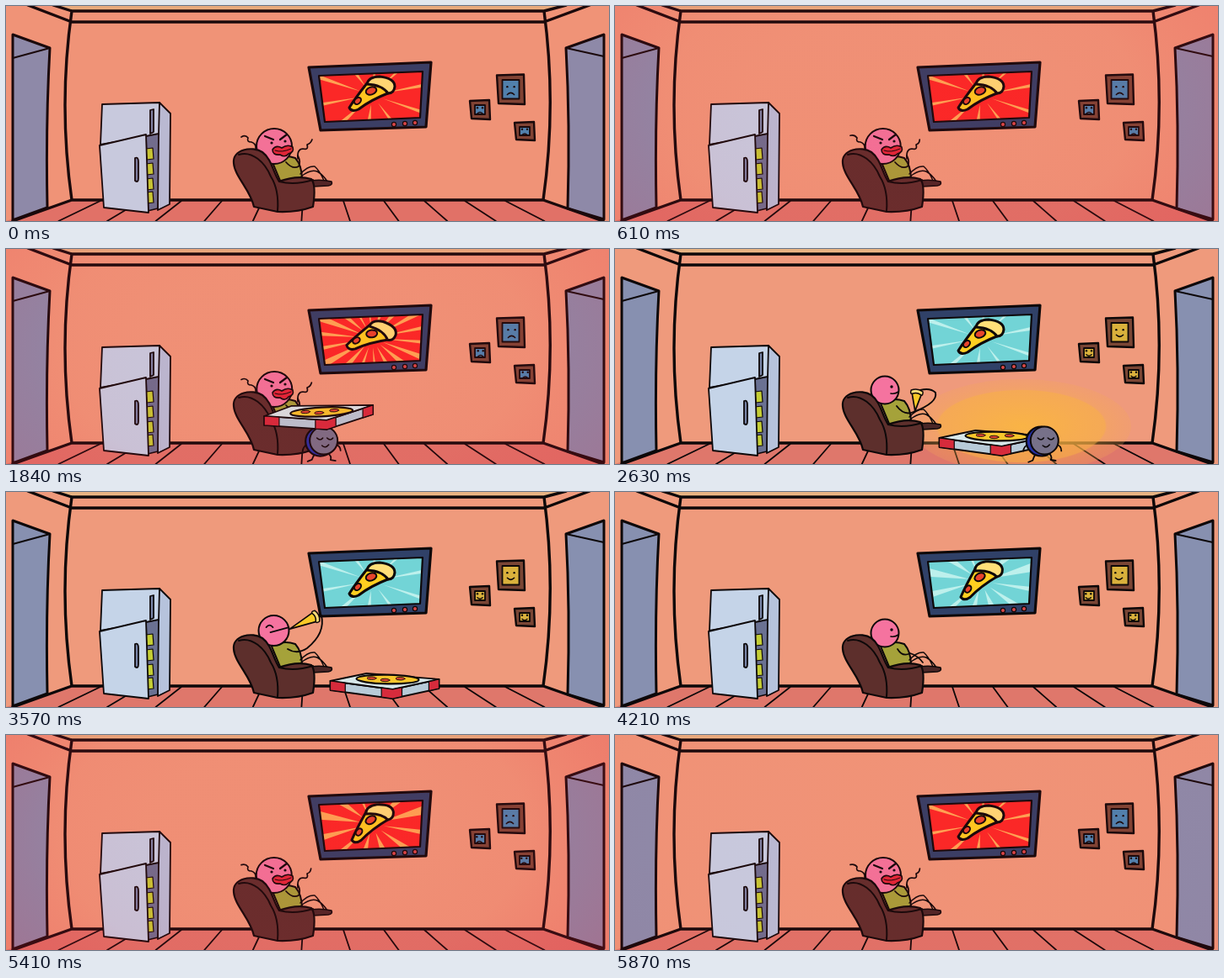
Recreate the animation shown at these times as an HTML page. Size 715 by 256 pixels, loop 5920 ms.

```html
<!DOCTYPE html>
<html lang="en">
<head>
<meta charset="utf-8">
<title>Pizza delivery</title>
<style>
html, body { margin: 0; width: 100%; height: 100%; overflow: hidden; background: #ef9a7c; }
svg { display: block; width: 100%; height: 100%; }
.ink { stroke: #0d0809; stroke-linejoin: round; stroke-linecap: round; }
.line { fill: none; }
</style>
</head>
<body>
<svg viewBox="0 0 715 256" preserveAspectRatio="none">
  <defs>
    <radialGradient id="rage" gradientUnits="userSpaceOnUse" cx="0" cy="0" r="1" gradientTransform="translate(340 115) scale(430 260)">
      <stop offset=".4" stop-color="#e8203c" stop-opacity=".04"/>
      <stop offset=".65" stop-color="#e8203c" stop-opacity=".07"/>
      <stop offset=".75" stop-color="#e8203c" stop-opacity=".12"/>
      <stop offset="1" stop-color="#e8203c" stop-opacity=".22"/>
    </radialGradient>
    <radialGradient id="warm">
      <stop offset="0" stop-color="#fbb83c" stop-opacity=".85"/>
      <stop offset=".76" stop-color="#f8b045" stop-opacity=".7"/>
      <stop offset=".78" stop-color="#f8b045" stop-opacity=".35"/>
      <stop offset="1" stop-color="#f5a755" stop-opacity=".25"/>
    </radialGradient>
    <clipPath id="screenClip"><path d="M371 83L494 78L491 133L378 138Z"/></clipPath>
    <clipPath id="doors"><path d="M8 0H708V256H8Z"/></clipPath>
  </defs>

  <g class="ink" stroke-width="3">
    <path d="M0 0H715V256H0Z" fill="#ef9a7c" stroke="none"/>
    <path d="M58 0L78 6H638L662 0Z" fill="#e8b382" stroke="none"/>
    <path d="M0 256L78 231H637L710 256Z" fill="#df776b" stroke="none"/>
    <path id="planks" class="line" stroke-width="1.8"/>
    <path d="M8 34L52 50Q47 140 49 240L8 255Z" fill="#8790b0"/>
    <path d="M709 34L664 50Q669 140 666 241L709 254Z" fill="#8790b0"/>
    <path class="line" stroke-width="2" d="M52 50L8 62M664 50L709 60"/>
    <path class="line" stroke-width="3.4" d="M56 -1L78 6H638L664 -1M26 -1L78 19H638L692 -1M78 6Q62 118 78 231H637Q653 118 638 6M78 231L8 256M637 231L708 256"/>
  </g>

  <ellipse id="glow" fill="url(#warm)"/>

  <g class="ink" stroke-width="1.8" fill="#c5d4e8">
    <path d="M182 115L195 128L194 236L180 243L176 154Z" fill="#b6c3dc"/>
    <path d="M114 117L182 115L181 153L112 165Z"/>
    <path d="M166 155L181 152L180 241L168 244Z" fill="#6a7192"/>
    <g id="food"></g>
    <path d="M111 166L166 153L169 246L116 240Z"/>
    <path d="M171 124L175 123V150L171 152Z" fill="#7885a8"/>
    <path d="M153 181Q157 179 157 186V205Q157 211 153 208Z" fill="#7885a8"/>
  </g>

  <g class="ink" stroke-width="3.2">
    <path d="M359 73L504 67L498 144L373 148Z" fill="#304168"/>
    <g clip-path="url(#screenClip)" stroke="none">
      <path id="screen" d="M365 73H500V143H365Z"/>
      <path id="rays"/>
    </g>
    <path class="line" stroke-width="2.2" d="M371 83L494 78L491 133L378 138Z"/>
    <g fill="#d84848" stroke-width="1.2">
      <circle cx="460" cy="141" r="2.6"/><circle cx="473" cy="140" r="2.6"/><circle cx="485" cy="139" r="2.6"/>
    </g>
    <g id="tvPizza" stroke-width="3">
      <path d="M428 92Q444 91 455 103Q432 112 418 123Q410 127 407 121Q414 110 428 92Z" fill="#ffcf20"/>
      <path d="M428 93Q430 84 443 84Q461 86 461 96Q460 104 453 104Q446 94 428 93Z" fill="#ffdf78"/>
      <ellipse cx="433" cy="101" rx="6.5" ry="4.4" transform="rotate(-20 433 101)" fill="#e8452c" stroke-width="2"/>
      <ellipse cx="417" cy="113" rx="4.6" ry="3.3" transform="rotate(-45 417 113)" fill="#e8452c" stroke-width="2"/>
    </g>
  </g>

  <g id="pictures" class="ink"></g>
  <g id="man" class="ink"></g>
  <g class="ink" clip-path="url(#doors)">
    <g id="robotBack"></g>
    <g id="box"></g>
    <g id="robotFront"></g>
  </g>
  <path id="tint" d="M0 0H715V256H0Z" fill="#ff2030"/>
  <path id="vignette" d="M0 0H715V256H0Z" fill="url(#rage)"/>
</svg>
<script>
const LOOP = 5920, CALM = 2060, SLICE = 2450, FINISH = 4180, TV_RED = 4390, RAGE = 4540;
const $ = id => document.getElementById(id);
const set = (id, attrs) => { for (const k in attrs) $(id).setAttribute(k, attrs[k]); };
const clamp = v => Math.max(0, Math.min(1, v));
const ramp = (t, a, b) => clamp((t - a) / (b - a));
const ease = p => p * p * (3 - 2 * p);
const mix = (a, b, p) => a + (b - a) * p;
const path = (d, fill = 'none', width = 2) => `<path d="${d}" fill="${fill}" stroke-width="${width}"/>`;
const poly = (points, fill, width) => path(`M${points.join('L')}Z`, fill, width);
const dot = (x, y, r, fill = '#0d0809', width = 0) => `<circle cx="${x}" cy="${y}" r="${r}" fill="${fill}" stroke-width="${width}"/>`;
const oval = (x, y, rx, ry, fill, width) => `<ellipse cx="${x}" cy="${y}" rx="${rx}" ry="${ry}" fill="${fill}" stroke-width="${width}"/>`;

let planks = '';
for (let x = 112; x < 600; x += 48) planks += `M${x} 232L${360 + (x - 360) * 1.2} 256`;
set('planks', { d: planks });

$('food').innerHTML = [169, 187, 205, 221]
  .map(y => path(`M166 ${y + 1}L174 ${y}L175 ${y + 13}L167 ${y + 14}Z`, '#c5ce35', 1.2)).join('');

function rayPath(count, width, turn) {
  let d = '';
  for (let i = 0; i < count; i++) {
    const a = turn + i / count * 2 * Math.PI, w = width * (.6 + .5 * Math.sin(i * 2.4) ** 2);
    const at = (r, b) => `${434 + r * Math.cos(b)} ${106 + r * .8 * Math.sin(b)}`;
    d += `M${at(14, a)}L${at(90, a - w)}L${at(90, a + w)}Z`;
  }
  return d;
}

function drawTv(t) {
  const happy = t >= CALM && t < TV_RED;
  const slot = Math.floor(t / (LOOP / 36) + .36) % 6;
  const turn = [0, -9, 0, -9, 0, 13][slot];
  set('screen', { fill: happy ? '#72d4d6' : '#fb2927' });
  set('rays', {
    d: turn < 0 ? rayPath(12, .1, .2) : turn > 0 ? rayPath(18, .075, .1) : rayPath(10, .065, .4),
    fill: happy ? '#bdf0ec' : '#ffa956'
  });
  set('tvPizza', { transform: `rotate(${turn} 434 104)` });
  drawPictures(happy, turn);
}

function drawPictures(happy, turn) {
  const one = (x, y, w, h, b) => {
    const cx = x + w / 2, cy = y + h / 2, s = w / 32, look = Math.sign(turn) * s;
    const bend = happy ? 4 * s : -4 * s, my = cy + (happy ? 3 : 6) * s;
    return path(`M${x} ${y + 1}L${x + w - 1} ${y}L${x + w} ${y + h}L${x + 2} ${y + h - 1}Z`, '#7a4635', 2.4)
      + path(`M${x + b} ${y + b}H${x + w - b}V${y + h - b}H${x + b}Z`, happy ? '#d9b13c' : '#4786b4', 1.8)
      + dot(cx - 4 * s + look, cy - 3 * s, 1.2) + dot(cx + 4 * s + look, cy - 3 * s, 1.2)
      + path(`M${cx - 4 * s + look} ${my}q${4 * s} ${bend} ${8 * s} 0`, 'none', 1.5);
  };
  $('pictures').innerHTML = one(582, 81.5, 33, 35.5, 6.5) + one(550, 112, 24, 23, 6) + one(603, 138, 24, 22, 6);
}

function chair() {
  return path('M270 187C268 171 292 166 304 174C315 182 317 199 324 209Q345 201 362 206Q368 213 364 239Q345 246 322 245L294 239C290 219 271 203 270 187Z', '#5d2f2c', 2.2)
    + path('M276 177C292 172 307 186 314 203Q324 219 322 244M324 209Q342 214 364 207');
}

function legs() {
  return path('M349 200Q358 190 366 191Q372 196 377 208M350 203Q361 194 369 197Q376 201 381 209', 'none', 1.5)
    + path('M362 208Q373 206 386 209Q388 213 382 214L364 215Z', '#4a2727', 1.5);
}

const body = () => path('M315 184Q328 176 343 181Q351 190 351 206L325 208Z', '#a5a23a');

function angryMan(t) {
  const j = Math.sin(t / 55) * .7, k = Math.cos(t / 70);
  return path(`M296 170Q297 164 291 162Q285 162 287 157Q284 153 279 ${155 + k}`, 'none', 1.7)
    + body()
    + dot(318 + j * .4, 167, 21, '#f2769e', 2)
    + path('M307 155L317 159M325 159L333 153', 'none', 2.2)
    + dot(315, 163, 1.6) + dot(331, 161, 1.6)
    + path(`M316 171Q320 165 327 169Q334 164 340 168Q342 174 335 176Q331 ${181 + j} 325 177Q316 178 316 171Z`, '#df2638', 1.6)
    + path('M319 172Q327 175 338 170', 'none', 1)
    + path('M332 186Q340 195 347 191Q350 186 346 178', 'none', 1.7)
    + path(`M346 182Q345 170 352 170Q359 172 357 165Q361 164 ${362 + k} 159`, 'none', 1.7);
}

function calmMan(t) {
  const lift = ease(ramp(t, 2850, 3300)) * (1 - ease(ramp(t, 3950, FINISH)));
  const has = t >= SLICE && t < FINISH;
  const chew = lift > .9 ? Math.sin(t / 60) * .6 : 0;
  const hx = mix(320, 317.5, lift), hy = mix(168, 165, lift) + chew, r = mix(16.5, 18, lift);
  let s = body() + dot(hx, hy, r, '#f5739f', 2);
  s += lift > .5
    ? path(`M${hx - 9} ${hy - 4}q4 -5 8 0M${hx - 4} ${hy + 2}L${hx + 18} ${hy - 4}`, 'none', 1.7)
    : dot(hx + 8, hy - 4, 1.7) + path(`M${hx + 7} ${hy + 4}q5 1 9 -2`, 'none', 1.7);
  const hand = [mix(380, 374, lift), mix(171, 147, lift)];
  s += has
    ? path(`M334 187Q${mix(343, 345, lift)} ${mix(199, 194, lift)} ${mix(354, 357, lift)} ${mix(194, 186, lift)}Q${mix(383, 379, lift)} ${mix(183, 168, lift)} ${hand}Q${mix(374, 372, lift)} ${mix(165, 146, lift)} ${mix(362, 368, lift)} ${mix(168, 150, lift)}`, 'none', 1.9)
    : path('M335 187Q341 197 350 192Q359 195 365 203', 'none', 1.7);
  if (has) {
    const size = 1 - .75 * ramp(t, 3600, 4100);
    const x = mix(358, 368, lift), y = mix(170, 148, lift), a = mix(8, 66, lift);
    s += `<g transform="translate(${x} ${y}) rotate(${a})">`
      + path(`M-6 1L6 1L1 ${mix(23, 35, lift) * size}Z`, '#f7c927', 1.7)
      + path('M-7 -1Q0 -5 7 -1Q8 4 5 3Q0 0 -5 3Q-8 4 -7 -1Z', '#ffdc77', 1.5) + '</g>';
  }
  return s;
}

function robot(x, y, t) {
  const step = Math.sin(t / 65) * 4;
  return path(`M${x - 8} ${y + 15}q-3 5 -4 ${8 + step / 2}l-5 2M${x + 7} ${y + 15}q5 4 ${3 - step / 2} 8l6 1M${x - 15} ${y + 3}q-8 4 -8 ${10 - step / 3}M${x + 15} ${y + 4}q7 2 7 ${8 + step / 3}`, 'none', 1.8)
    + dot(x - 2, y + 1, 17.5, '#2430a4', 2.2)
    + dot(x + 2, y, 16.5, '#777189', 2)
    + path(`M${x - 6} ${y - 3}q4 4 7 0M${x + 6} ${y - 3}q4 4 7 0M${x} ${y + 6}q4 4 8 -1`, 'none', 1.6);
}

// The open box tilts as it is set down.
function pizzaBox(tilt) {
  const left = [0, mix(13, 8, tilt)], back = [mix(32, 43, tilt), mix(1, -1, tilt)];
  const right = [129, mix(0, 6, tilt)], front = [74, 18];
  const along = (a, b, p) => [mix(a[0], b[0], p), mix(a[1], b[1], p)];
  const down = ([x, y]) => [x, y + 11];
  const side = (a, b, fill, width) => poly([a, b, down(b), down(a)], fill, width);
  const red = '#d62b3c', cx = 68, cy = mix(8, 6, tilt);
  const nearLeft = along(front, left, .18), nearRight = along(front, right, .2);
  return side(left, front, '#b8cbd8', 1.8) + side(front, right, '#b8cbd8', 1.8)
    + poly([left, back, right, front], '#d8e8ea', 1.8)
    + side(left, along(left, front, .24), red, 1.2)
    + poly([nearLeft, front, nearRight, down(nearRight), down(front), down(nearLeft)], red, 1.2)
    + side(along(right, front, .22), right, red, 1.2)
    + `<g transform="rotate(${mix(-3, 1, tilt)} ${cx} ${cy})">`
    + oval(cx, cy, 37, 5.4, '#f8c62c', 2.2)
    + [-19, -3, 15].map((dx, i) => oval(cx + dx, cy + i % 2 * 2 - 1, 5.5, 1.7, '#df4630', .9)).join('') + '</g>';
}

function drawDelivery(t) {
  const carryX = 119 + .37 * (t - 1150), stop = 453;
  const x = t < 2300 ? Math.min(carryX, stop)
    : t < 2630 ? mix(stop, 507, ramp(t, 2300, 2630))
    : 507 + .26 * (t - 2630);
  const drop = ease(ramp(t, 2060, 2260));
  const bob = t < 2060 ? Math.sin(t / 65) * .6 : 0;
  const front = t > 2300;
  const art = t > 660 && t < 3530 ? robot(x, 228 + Math.abs(bob), t) : '';
  $('robotBack').innerHTML = front ? '' : art;
  $('robotFront').innerHTML = front ? art : '';
  $('box').innerHTML = pizzaBox(drop);
  set('box', {
    transform: `translate(${Math.min(carryX, stop) - 68.5} ${mix(186, 217, drop) + bob})`,
    opacity: t > 660 ? 1 - ramp(t, 4000, 4200) : 0
  });
}

function drawGlow(t) {
  const first = ramp(t, 800, 1100) * (1 - ramp(t, 1250, 1650));
  const second = ramp(t, 2200, 2500) * (1 - ramp(t, 2750, 3400));
  set('glow', t > 1900
    ? { cx: 482, cy: 211, rx: 130, ry: 56, opacity: second }
    : { cx: 152, cy: 169, rx: 133, ry: 47, opacity: first });
}

function render(t) {
  drawTv(t);
  const calm = t >= CALM && t < RAGE;
  $('man').innerHTML = (calm ? calmMan(t) : angryMan(t)) + legs() + chair();
  drawDelivery(t);
  drawGlow(t);
  const tint = t < RAGE ? 1 - ramp(t, 1940, 2500) : ramp(t, RAGE, 4800);
  const pulse = t < 2450 ? Math.sin(Math.PI * t / 2450)
    : t > RAGE ? Math.sin(Math.PI * (t - RAGE) / (LOOP - RAGE)) : 0;
  set('tint', { opacity: .055 * tint });
  set('vignette', { opacity: pulse });
}

function tick() {
  render(performance.now() % LOOP);
  requestAnimationFrame(tick);
}
tick();
</script>
</body>
</html>
```
